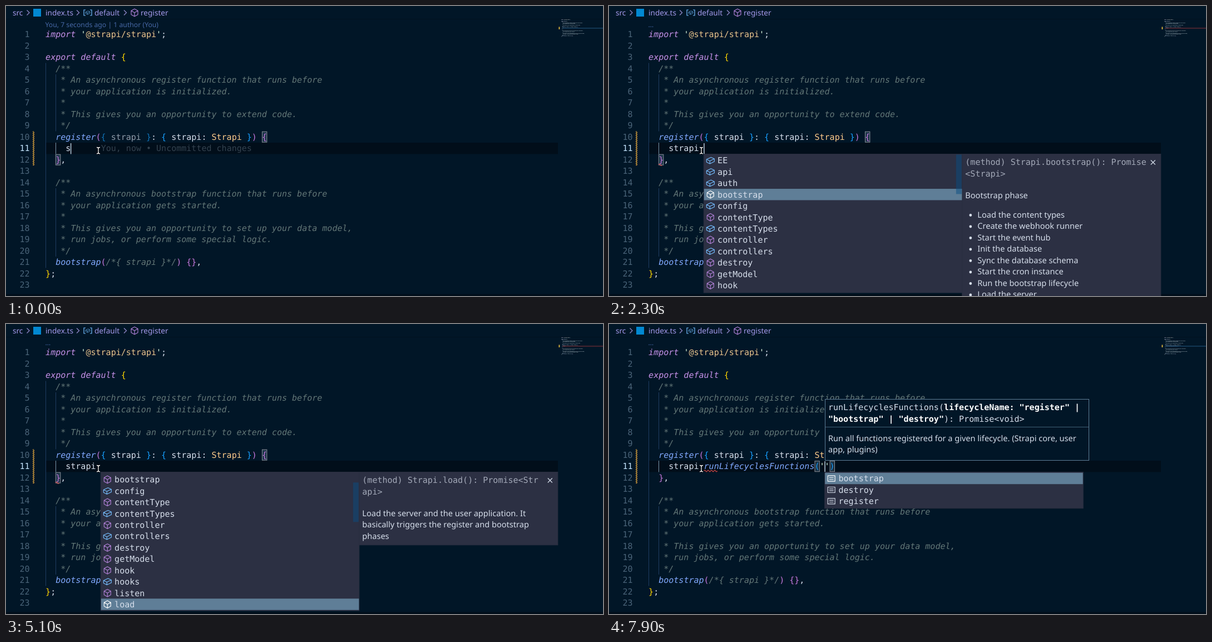
Recreate the animation shown at these times as an HTML page. Size 1073 by 522 pixels, loop 8000 ms.

```html
<!DOCTYPE html>
<html lang="en">
<head>
<meta charset="utf-8">
<title>Editor autocomplete</title>
<style>
html, body { margin: 0; width: 100%; height: 100%; overflow: hidden; background: #011627; }
svg { display: block; width: 1073px; height: 522px; }
text { white-space: pre; text-rendering: geometricPrecision; fill: #d6deeb; }
.mono { font: 15.03px "DejaVu Sans Mono", monospace; }
.sans { font: 14.57px "Noto Sans", sans-serif; }
.crumb { font: 13.6px "Noto Sans", sans-serif; fill: #a599e9; }
.lens { font: 12.22px "Noto Sans", sans-serif; fill: #4768a6; }
.num { fill: #4b6479; text-anchor: end; }
.num.now { fill: #c5e4fd; }
.head { fill: #a3a9b8; }
.ghost { fill: #34424f; }
.keyword { fill: #c792ea; font-style: italic; }
.string { fill: #ecc48d; }
.quote { fill: #d9f5dd; }
.comment { fill: #637777; font-style: italic; }
.fn { fill: #82aaff; font-style: italic; }
.type { fill: #ffcb8b; }
.gold { fill: #ffd700; }
.pink { fill: #c678dd; }
.blue { fill: #179fff; }
.dim { fill-opacity: .67; }
.bold { font-weight: bold; fill: #fff; }
.icon { fill: none; stroke-width: 1.15; stroke-linejoin: round; }
</style>
</head>
<body>
<svg id="stage" viewBox="0 0 1073 522"></svg>
<script>
const LOOP = 8000, LEFT = 71.1, CHAR = 9.05, LINE = 20.5, ROW = 20.42;
const METHOD = 'M8 1.3L14 4.6V11.4L8 14.7L2 11.4V4.6ZM2 4.6L8 8L14 4.6M8 8V14.7';
const FIELD = 'M1 6L9 2.3L15 5V10L7 13.8L1 10.8ZM1 6L7 8.8L15 5M7 8.8V13.8';
const CONSTANT = 'M1.5 3H14.5V13H1.5ZM4 6.4H12M4 9.6H12';

const esc = s => s.replace(/&/g, '&amp;').replace(/</g, '&lt;');
const span = cls => s => `<tspan class="${cls}">${esc(s)}</tspan>`;
const [kw, str, quote, note, fn, type, gold, pink, blue, dim, bold] =
  ['keyword', 'string', 'quote', 'comment', 'fn', 'type', 'gold', 'pink', 'blue', 'dim', 'bold'].map(span);
const text = (x, y, body, cls = 'mono') => `<text x="${x}" y="${y}" class="${cls}">${body}</text>`;
const rect = (x, y, w, h, fill, extra = '') =>
  `<rect x="${x}" y="${y}" width="${w}" height="${h}" fill="${fill}" ${extra}/>`;
const path = (d, stroke, extra = '') => `<path d="${d}" stroke="${stroke}" fill="none" ${extra}/>`;
const icon = (d, x, y, color, scale = 1) =>
  path(d, color, `class="icon" transform="translate(${x} ${y}) scale(${scale})"`);
const colX = col => LEFT + col * CHAR;
const rowTop = line => 41 + (line - 1) * LINE;
const latest = (steps, t) => steps.reduce((found, s) => t >= s[0] ? s : found, null);

const typed = [[0, 's'], [150, 'st'], [300, 'str'], [450, 'stra'], [600, 'strap'], [800, 'strapi'],
  [1100, 'strapi.'], [6500, 'strapi.r'], [7200, 'strapi.runLifecyclesFunctions'],
  [7500, 'strapi.runLifecyclesFunctions()'], [7700, "strapi.runLifecyclesFunctions('')"]];

// Selected row over time
const browse = [[1150, 0], [1900, 1], [2100, 2], [2300, 3], [2600, 4], [2900, 5], [3100, 6], [3250, 7],
  [3450, 8], [3600, 9], [4100, 10], [4300, 11], [4550, 12], [4750, 13], [4950, 14]];
const filter = [[6500, 0], [6800, 1], [6950, 2], [7050, 3]];

const members = ('EE* api* auth* bootstrap config* contentType contentTypes* controller controllers* ' +
  'destroy getModel hook hooks* listen load').split(' ');
const matches = ('register registerInternalHooks reload runLifecyclesFunctions service services* query ' +
  'start startWebhooks controller controllers* destroy').split(' ');

// Each entry: signature lines, paragraph lines, list items ("- " nested, "  " continued)
const docs = {
  EE: [['(property) Strapi.EE: any'], ['Getter for the Strapi enterprise edition', 'configuration']],
  auth: [['(property) Strapi.auth: any'], ['Getter for the Strapi auth container']],
  bootstrap: [['(method) Strapi.bootstrap(): Promise', '<Strapi>'], ['Bootstrap phase'],
    ['Load the content types', 'Create the webhook runner', 'Start the event hub', 'Init the database',
      'Sync the database schema', 'Start the cron instance', 'Run the bootstrap lifecycle', 'Load the server']],
  contentType: [['(method) Strapi.contentType(uid: st', 'ring): any'],
    ['Find a content type using its unique identifier']],
  controller: [['(method) Strapi.controller(uid: str', 'ing): any'],
    ['Find a controller using its unique identifier']],
  destroy: [['(method) Strapi.destroy(): Promise<', 'void>'], ['Destroy phase'],
    ['Destroy Strapi server', 'Run all the `', '  by the user application or the enabled plugins',
      'Cleanup the event hub', 'Gracefully stop the database', 'Stop the telemetry and cron instance',
      'Cleanup the global scope by removing', '  global strapi']],
  hook: [['(method) Strapi.hook(uid: string):', 'any'], ['Find a hook using its unique identifier']],
  load: [['(method) Strapi.load(): Promise<Str', 'api>'],
    ['Load the server and the user application. It', 'basically triggers the register and bootstrap', 'phases']],
  register: [['(method) Strapi.register(): Promise', '<Strapi>'], ['Strapi Register Lifecycle.'],
    ['Load', '- The user application', '- The plugins', '- The admin', '- The APIs', '- The components',
      '- The middlewares', '- The policies']],
  reload: [['(method) Strapi.reload(): void'], ['Restart the server']],
  runLifecyclesFunctions: [['(method) Strapi.runLifecyclesFunctio', 'ns(lifecycleName): Promise<void>'],
    ['Run all functions registered for a given', 'lifecycle. (Strapi core, user app, plugins)']]
};

function codeLines(line11, unused) {
  const maybe = s => unused ? dim(s) : esc(s);
  const brace = s => unused ? `<tspan class="blue dim">${s}</tspan>` : blue(s);
  const block = (...rows) => ['  /**', ...rows.map(r => '   *' + (r && ' ' + r)), '   */'].map(note);
  return [
    kw('import') + ' ' + quote("'") + str('@strapi/strapi') + quote("'") + ';',
    '',
    kw('export default') + ' ' + gold('{'),
    ...block('An asynchronous register function that runs before', 'your application is initialized.', '',
      'This gives you an opportunity to extend code.'),
    '  ' + fn('register') + pink('(') + brace('{') + maybe(' strapi ') + brace('}') + ': ' + blue('{') +
      ' strapi: ' + type('Strapi') + ' ' + blue('}') + pink(')') + ' ' + pink('{'),
    '    ' + line11,
    '  ' + pink('}') + ',',
    '',
    ...block('An asynchronous bootstrap function that runs before', 'your application gets started.', '',
      'This gives you an opportunity to set up your data model,', 'run jobs, or perform some special logic.'),
    '  ' + fn('bootstrap') + pink('(') + note('/*{ strapi }*/') + pink(')') + ' ' + pink('{}') + ',',
    gold('}') + ';',
    ''
  ];
}

function breadcrumb() {
  const chevron = x => path(`M${x} 7.5l4.5 4.5l-4.5 4.5`, '#8f88c8', 'stroke-width="1.3"');
  return text(12, 16.5, 'src', 'crumb') + chevron(37.5) + rect(49, 5, 14, 14, '#0288d1') +
    text(71, 16.5, 'index.ts', 'crumb') + chevron(127) +
    path('M143 7h-3v10h3M151 7h3v10h-3', '#75beff', 'stroke-width="1.2"') +
    icon(FIELD, 142.6, 7.6, '#75beff', .55) +
    text(159, 16.5, 'default', 'crumb') + chevron(212) + icon(METHOD, 223, 4, '#b180d7') +
    text(242, 16.5, 'register', 'crumb') + rect(0, 23, 1073, 1, '#01111f');
}

function bracketBox(col, line) {
  return rect(colX(col) + .2, rowTop(line) + .7, 8.4, 19, '#5f7e97', 'fill-opacity=".3" stroke="#8a8f98" stroke-width="1"');
}

function squiggle(x, y, count) {
  return path(`M${x} ${y}` + 'q1.5 -3 3 0t3 0'.repeat(count), '#ef5350', 'stroke-width="1.2"');
}

function minimap(lines, error) {
  const tiny = lines.map((l, i) => l && text(0, 15 + i * LINE, l)).join('');
  return `<g transform="translate(998 24) scale(.076 .0705)" stroke="#8a97a3" stroke-width="2.5">${tiny}</g>` +
    rect(1000, 39, 73, 1.8, error ? '#a8393d' : '#2b6797', 'opacity=".45"') + rect(993.5, 37.5, 1.8, 4.5, '#e2b93d');
}

function editor(s) {
  const parts = s.typed.match(/^(strapi\.)(run\w+)(.*)$/);
  const args = parts && parts[3];
  let line11 = esc(s.typed);
  if (parts) line11 = parts[1] + fn(parts[2]) + (args ? blue('(') + quote(args.slice(1, -1)) + blue(')') : '');
  const lines = codeLines(line11, s.unused);
  const guide = (col, from, to, color = '#1f3c61') =>
    path(`M${Math.floor(colX(col)) + .5} ${rowTop(from)}V${rowTop(to + 1)}`, color);

  let out = rect(71, rowTop(11), 921, LINE, '#010e1a') + guide(0, 4, 21) + guide(2, 5, 9) + guide(2, 15, 20) +
    guide(2, 11, 11, '#7e97ac') + rect(48, rowTop(10), 3, 3 * LINE, 'url(#hatch)');
  out += args ? bracketBox(33, 11) + bracketBox(32 + args.length, 11) : bracketBox(43, 10) + bracketBox(2, 12);
  lines.forEach((line, i) => {
    const y = 56.4 + i * LINE;
    out += text(42.6, y, i + 1, 'mono num' + (i === 10 ? ' now' : '')) + (line && text(LEFT, y, line));
  });
  out += text(70.5, 37.5, s.lens ? 'You, 7 seconds ago | 1 author (You)' : '…', 'lens');
  if (s.ghost) out += text(colX(11), 56.4 + 10 * LINE, 'You, now • Uncommitted changes', 'mono ghost');
  if (s.error) out += squiggle(colX(2), 286, 1);
  if (parts) out += squiggle(colX(11), 264.5, 4);
  const caret = 4 + s.typed.length - (args ? args.length / 2 : 0);
  if (s.caret) out += rect(colX(caret) - .5, 247, 1.5, 19.5, '#b8cbdb');
  return out + minimap(lines, s.error);
}

function menu(x, items, sel, prefix, thumb, glyph) {
  const height = glyph ? items.length * ROW + 4 : 249.5;
  const scroll = sel > 11 ? (sel - 11) * ROW - 1.9 : 0;
  let list = '';
  items.forEach((item, i) => {
    const top = 267.8 + i * ROW - scroll, isField = item.endsWith('*'), name = item.replace('*', '');
    const color = i === sel ? '#fff' : glyph ? '#d6deeb' : isField ? '#75beff' : '#b180d7';
    if (i === sel) list += rect(x, top, 463.5, ROW, '#5f7e97');
    const label = prefix && name.startsWith(prefix) ? bold(prefix) + name.slice(prefix.length) : name;
    list += icon(glyph || (isField ? FIELD : METHOD), x + 3.5, top + 2.3, color) + text(x + 24.3, top + 15.6, label);
  });
  return rect(x - .5, 266.5, 464.5, height, '#2c3043', 'stroke="#2b2f40"') +
    `<g clip-path="url(#list)">${list}</g>` +
    (thumb ? rect(x + 453, 267.5 + scroll * .3, 10, thumb, '#084d81', 'fill-opacity=".5"') : '');
}

function details(x, name, isField) {
  const fallback = isField ? `(property) Strapi.${name}: any` : `(method) Strapi.${name}(): any`;
  const [head, para, items = []] = docs[name] || [[fallback], ['Getter for the Strapi ' + name]];
  const start = 281 + LINE * head.length + 18.5, last = start + (para.length - 1) * LINE;
  const bottom = items.length ? 522 : last + 16.3;
  let out = rect(x, 266.5, 357, bottom - 266.5, '#2c3043', 'stroke="#2b2f40"');
  head.forEach((line, i) => out += text(x + 5.5, 286.4 + i * LINE, esc(line), 'mono head'));
  para.forEach((line, i) => out += text(x + 5.5, start + 5.2 + i * LINE, line, 'sans'));
  out += path(`M${x + 339} 277.5l8 8m0 -8l-8 8`, '#d6deeb', 'stroke-width="1.2"');
  items.forEach((item, i) => {
    const y = last + 35.2 + i * LINE, nested = item.startsWith('- '), more = item.startsWith('  ');
    const left = x + (nested ? 49 : 27.5);
    if (!more) out += `<circle cx="${x + (nested ? 37 : 15)}" cy="${y + .8}" r="2.4" ` +
      (nested ? 'fill="none" stroke="#d6deeb"/>' : 'fill="#d6deeb"/>');
    out += text(left, y + 5.2, item.replace(/^(- |  )|`/g, ''), 'sans');
    if (item.endsWith('`')) out += rect(738, y - 7.5, 65, 17, '#47494f', 'rx="3"') +
      `<text x="744" y="${y + 4.8}" class="mono" style="font-size:12.6px">destroy</text>` +
      text(807, y + 5.2, 'lifecycle methods loaded', 'sans');
  });
  return out;
}

function signature() {
  return rect(388.5, 135.5, 474, 110, '#011627', 'stroke="#5f7e97"') + path('M389 185.5H862', '#5f7e97', 'opacity=".7"') +
    text(394, 155.4, 'runLifecyclesFunctions(' + bold('lifecycleName: "register" |')) +
    text(394, 175.8, bold('"bootstrap" | "destroy"') + '): Promise&lt;void>') +
    text(394, 210.6, 'Run all functions registered for a given lifecycle. (Strapi core, user', 'sans') +
    text(394, 231, 'app, plugins)', 'sans');
}

function stateAt(t) {
  const [since, value] = latest(typed, t);
  const blinkStart = since === 1100 ? 1150 : since;
  const steps = t < 6500 ? browse : t < 7200 ? filter : [];
  const step = latest(steps, t);
  return {
    typed: value, sel: step ? step[1] : -1, filtering: t >= 6500,
    caret: t < blinkStart || Math.floor((t - blinkStart) / 500) % 2 === 0,
    lens: t < 300, ghost: t < 100, unused: t < 1000,
    error: t >= 1800 && t < 7200, hint: t >= 7500, choices: t >= 7700
  };
}

const defs = `<defs><pattern id="hatch" width="3" height="3.6" patternUnits="userSpaceOnUse">
  <rect width="3" height="3.6" fill="#011627"/><path d="M0 3.4L3 .4M0 -.2L3 -3.2M0 7L3 4" stroke="#e2a53d" stroke-width="1.6"/></pattern>
  <clipPath id="list"><rect x="0" y="267" width="1073" height="248.5"/></clipPath></defs>`;

function draw(s) {
  let out = defs + rect(0, 0, 1073, 522, '#011627') + breadcrumb() + editor(s) + rect(0, 518.5, 1073, 4, '#010e1a');
  if (s.sel >= 0) {
    const items = s.filtering ? matches : members, x = s.filtering ? 179.5 : 170.8, item = items[s.sel];
    out += details(x + 464, item.replace('*', ''), item.endsWith('*')) +
      menu(x, items, s.sel, s.filtering && 'r', s.filtering ? 166 : 71);
  }
  if (s.hint) out += signature();
  if (s.choices) out += menu(388.2, ['bootstrap', 'destroy', 'register'], 0, '', 0, CONSTANT);
  const beam = 'M163 254.5q3 0 3 2q0 -2 3 -2M166 256V264M163 265.8q3 0 3 -2q0 2 3 2';
  return out + path(beam, '#000', 'stroke-width="2.6"') + path(beam, '#fff', 'stroke-width="1.3"');
}

const stage = document.getElementById('stage'), begin = performance.now();
let shown = '';
function tick() {
  const state = stateAt((performance.now() - begin) % LOOP), key = JSON.stringify(state);
  if (key !== shown) {
    stage.innerHTML = draw(state);
    shown = key;
  }
  requestAnimationFrame(tick);
}
tick();
</script>
</body>
</html>
```
